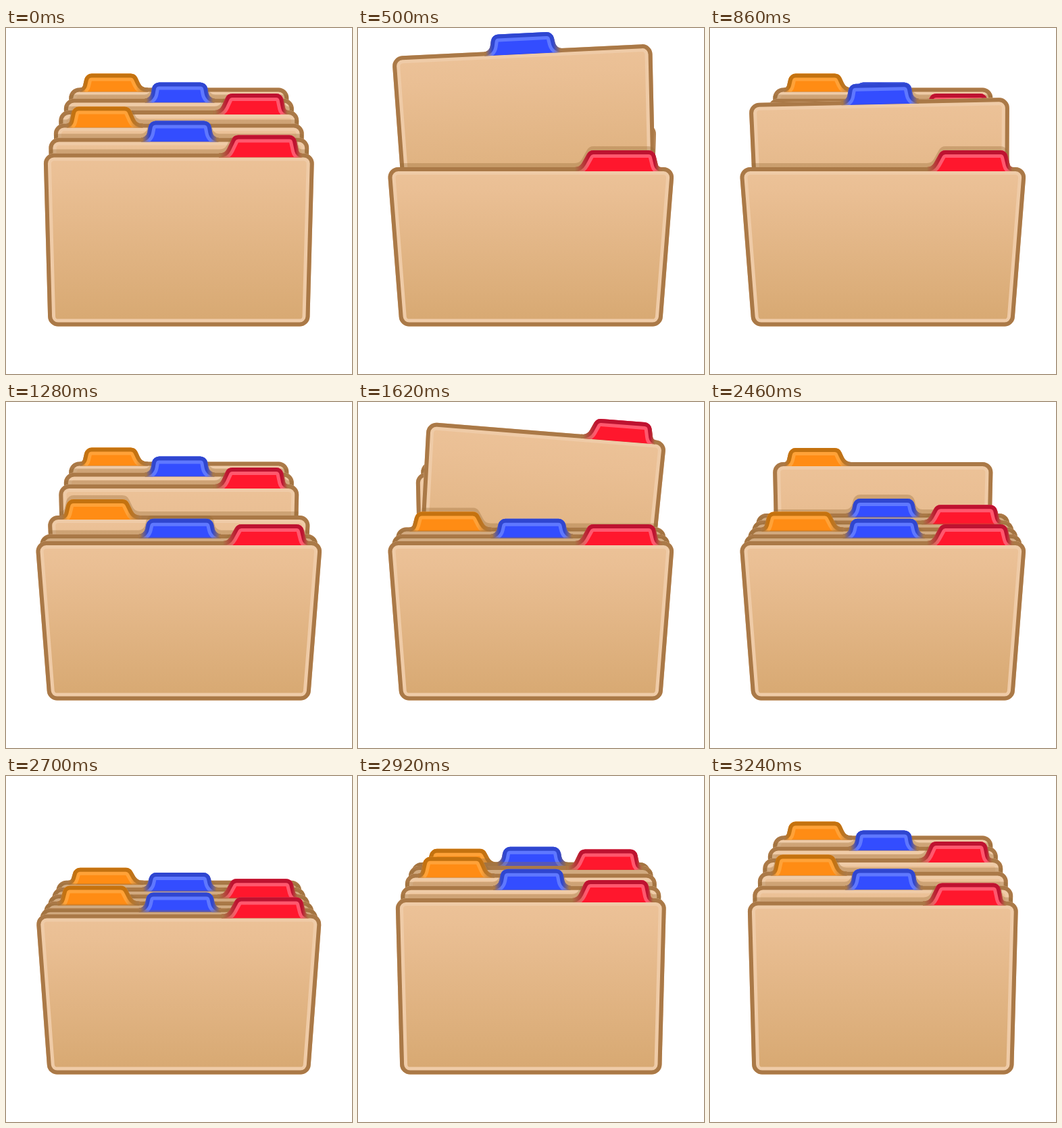
These frames come from a looping animation (512 px wide and 512 px high, 3280 ms). An HTML page with a canvas:

```html
<!DOCTYPE html>
<html lang="en">
<head>
<meta charset="utf-8">
<title>Card file</title>
<style>
html, body { margin: 0; width: 100%; height: 100%; overflow: hidden; background: #fff; }
canvas { display: block; width: 512px; height: 512px; }
</style>
</head>
<body>
<canvas id="stage" width="512" height="512"></canvas>
<script>
const ctx = document.getElementById('stage').getContext('2d');
const LOOP = 3280, MID = 255.8, EDGE = 6, BROWN = '#aa7947';

// Tab corners are fractions of the card's half width; r is [left, right] foot radius.
const RED = { x: [.34, .405, .86, .889], r: [12, 5], edge: '#be1230', shine: '#ff586e', fill: '#ff172d' };
const BLUE = { x: [-.25, -.225, .24, .265], r: [10, 10], edge: '#2f46d0', shine: '#5f78ff', fill: '#334dff' };
const ORANGE = { x: [-.876, -.846, -.395, -.335], r: [5, 12], edge: '#c4720f', shine: '#ffa238', fill: '#ff8c14' };

// Front to back: upright top, tab height, start and length of the lean.
const cards = [
  { tab: RED, top: 185.5, tall: 27, lean: [0, 240] },
  { tab: BLUE, top: 162.5, tall: 25, lean: [910, 210],
    lift: { up: [200, 320], down: [565, 390], dy: -131, turn: -2.8 } },
  { tab: ORANGE, top: 141.5, tall: 25, lean: [1140, 250] },
  { tab: RED, top: 122, tall: 25, lean: [2060, 190],
    lift: { up: [1400, 320], down: [1728, 395], dy: -98, turn: 5.6 } },
  { tab: BLUE, top: 104.5, tall: 24, lean: [2220, 220] },
  { tab: ORANGE, top: 88.5, tall: 21, lean: [2450, 200] }
];

const mix = (a, b, p) => a + (b - a) * p;
const span = (t, [start, length]) => Math.min(1, Math.max(0, (t - start) / length));
const sine = p => (1 - Math.cos(Math.PI * p)) / 2;
const quad = p => p < .5 ? 2 * p * p : 1 - 2 * (1 - p) * (1 - p);

function pose(card, i, t) {
  const back = 2660 + 31 * i;
  const lean = sine(span(t, card.lean)) - sine(span(t, [back, 240]));
  const u = Math.max(0, (t - back - 235) / 45);
  const bounce = 5 * (1 - i / 5) * u * Math.exp(1 - u);
  const { lift } = card;
  const raised = lift ? quad(span(t, lift.up)) - span(t, lift.down) ** 2 : 0;
  return {
    top: mix(card.top, 206 - 10.25 * i, lean) - bounce,
    half: mix(200.3 - 7.5 * i, 212.5 - 6 * i, lean),
    inset: mix(7, 18.5, lean),
    tall: card.tall - 2 * lean,
    bottom: 441.6 - 8 * i,
    dy: lift ? lift.dy * raised : 0,
    turn: lift ? lift.turn * raised * Math.PI / 180 : 0
  };
}

function bodyPath({ top, half, inset, bottom }) {
  const p = new Path2D(), low = half - inset, r = 15;
  p.moveTo(MID, top);
  p.arcTo(MID + half, top, MID + low, bottom, r);
  p.arcTo(MID + low, bottom, MID - low, bottom, r);
  p.arcTo(MID - low, bottom, MID - half, top, r);
  p.arcTo(MID - half, top, MID, top, r);
  p.closePath();
  return p;
}

function tabPath(tab, { top, half, tall }, closed) {
  const p = new Path2D(), peak = top - tall;
  const [a, b, c, d] = tab.x.map(x => MID + x * half);
  const left = a - tab.r[0] * .75, right = d + tab.r[1] * .75;
  p.moveTo(left, top);
  p.arcTo(a, top, b, peak, tab.r[0]);
  p.arcTo(b, peak, c, peak, 11);
  p.arcTo(c, peak, d, top, 11);
  p.arcTo(d, top, right, top, tab.r[1]);
  p.lineTo(right, top);
  if (closed) {
    p.lineTo(right, top + EDGE);
    p.lineTo(left, top + EDGE);
    p.closePath();
  }
  return p;
}

// Fades from the card's brown at both feet to the tab colour.
function footFade(tab, half, color) {
  const [a, b, c, d] = tab.x.map(x => MID + x * half);
  const x0 = a - tab.r[0] * .6, x1 = d + tab.r[1] * .6, w = x1 - x0;
  const g = ctx.createLinearGradient(x0, 0, x1, 0);
  g.addColorStop(0, BROWN);
  g.addColorStop((b - x0) / w, color);
  g.addColorStop((c - x0) / w, color);
  g.addColorStop(1, BROWN);
  return g;
}

// Fill with a shine line and an outer edge, both kept inside the shape.
function layered(shape, line, fill, shine, edge) {
  ctx.save();
  ctx.clip(shape);
  ctx.fillStyle = fill;
  ctx.fill(shape);
  ctx.lineWidth = 2 * (EDGE + 5);
  ctx.strokeStyle = shine;
  ctx.stroke(line);
  ctx.lineWidth = 2 * EDGE;
  ctx.strokeStyle = edge;
  ctx.stroke(line);
  ctx.restore();
}

// Moves the canvas to a card's raised and turned position.
function place(s) {
  ctx.resetTransform();
  ctx.translate(MID, s.bottom + s.dy);
  ctx.rotate(s.turn);
  ctx.translate(-MID, -s.bottom);
}

function build(card, i, t) {
  const s = pose(card, i, t), { tab } = card;
  const body = bodyPath(s), flap = tabPath(tab, s, true);
  const outline = new Path2D(body);
  outline.addPath(flap);
  return { s, tab, body, flap, outline };
}

// A card's shadow falls only on the one directly behind it.
function drawShadow(card, behind) {
  ctx.save();
  place(behind.s);
  ctx.clip(behind.outline);
  place(card.s);
  ctx.translate(0, -6);
  ctx.fillStyle = 'rgba(150, 105, 55, .34)';
  ctx.fill(card.outline);
  ctx.restore();
}

function drawCard({ s, tab, body, flap }) {
  ctx.save();
  place(s);
  const paper = ctx.createLinearGradient(0, s.top, 0, s.bottom);
  paper.addColorStop(0, '#ecc298');
  paper.addColorStop(.15, '#eabf94');
  paper.addColorStop(1, '#d7a871');
  layered(body, body, paper, '#efcba7', BROWN);
  layered(flap, tabPath(tab, s, false), tab.fill,
    footFade(tab, s.half, tab.shine), footFade(tab, s.half, tab.edge));
  ctx.restore();
}

const begin = performance.now();
function frame() {
  const t = (performance.now() - begin) % LOOP;
  const built = cards.map((card, i) => build(card, i, t));
  ctx.clearRect(0, 0, 512, 512);
  for (let i = built.length - 1; i >= 0; i--) {
    if (built[i + 1]) drawShadow(built[i], built[i + 1]);
    drawCard(built[i]);
  }
  requestAnimationFrame(frame);
}
frame();
</script>
</body>
</html>
```
